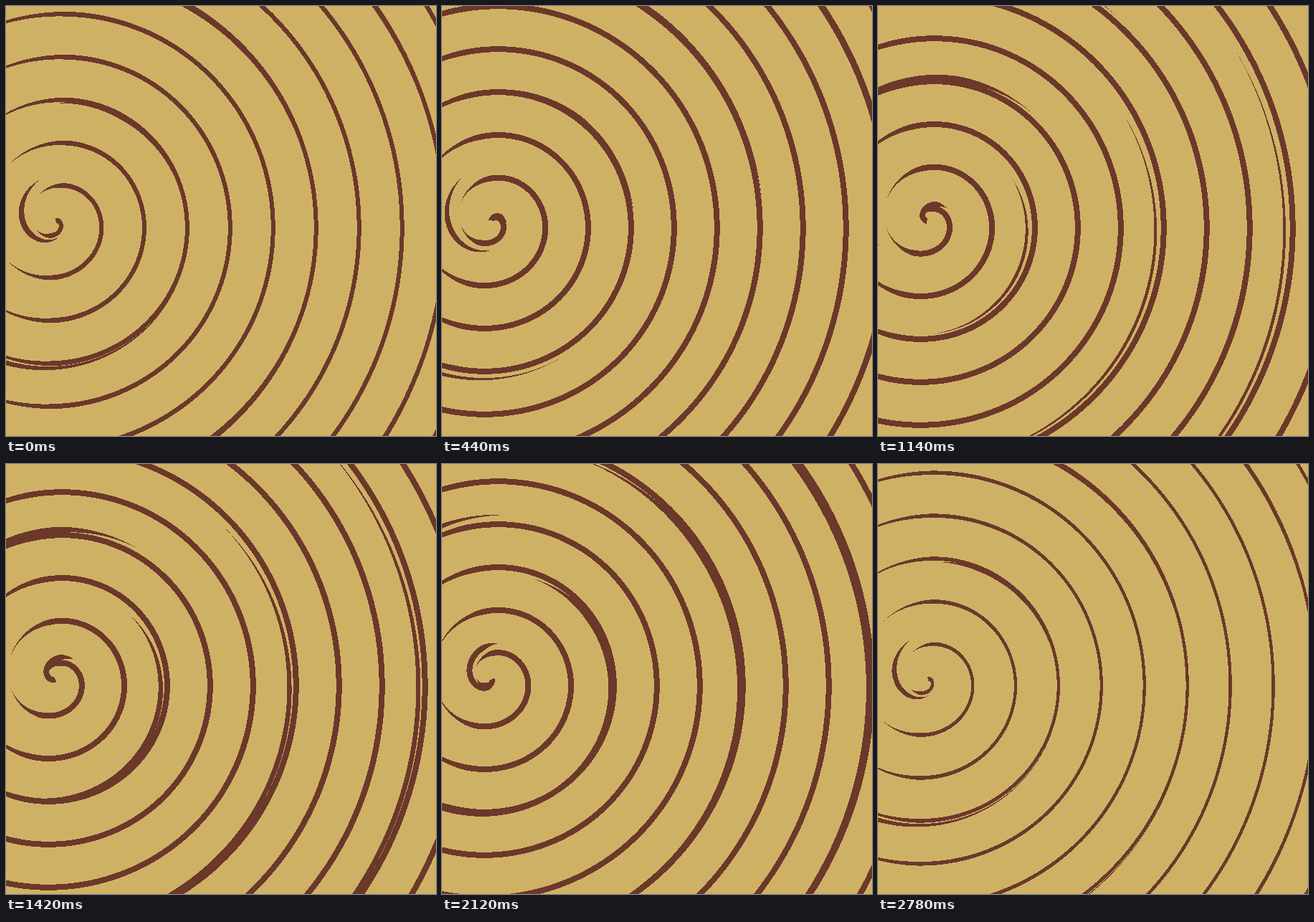
Animation of 600x600 px, one loop 2800 ms. Source, as an HTML page:

```html
<!DOCTYPE html>
<html lang="en">
<head>
<meta charset="utf-8">
<title>Spiral</title>
<style>
  html, body { margin: 0; width: 100%; height: 100%; overflow: hidden; background: #cfb166; }
  svg { display: block; width: 100%; height: 100%; }
  path { fill: #6b382a; shape-rendering: crispEdges; }
</style>
</head>
<body>
<svg viewBox="0 0 600 600"><path id="coil"/><path id="echo"/></svg>
<script>
const CX = 69, CY = 300, LOOP = 2800, MAX_R = 690;
const PITCH = 60, REPEAT = 180, SPREAD = 1.37, STEP = 2;
const RAD = Math.PI / 180;
const coil = document.getElementById('coil');
const echo = document.getElementById('echo');

// Each group of three steps cycles through these line styles;
// width depends on the cosine of the line's normal.
const STYLES = [
  { shift: 0.2, gain: 9, cut: 0.72, fade: 0.2, width: c => 7 - c },
  { shift: 1.2, gain: 11, cut: 0.95, fade: 0, width: () => 8 },
  { shift: 0.2, gain: 9, cut: 0.66, fade: 0.33, width: c => 5.6 - 1.3 * c }
];

// 60 steps per loop, held for 20, 100 and 20 ms in turn.
function stepAt(ms) {
  const rest = ms % 140;
  return 3 * Math.floor(ms / 140) + (rest < 20 ? 0 : rest < 120 ? 1 : 2);
}

// A band along a spiral; margin(cosine, angle) says how far it is from fading out.
function ribbon(from, to, radius, pitch, style, margin) {
  const outer = [], inner = [], slope = pitch / (2 * Math.PI);
  for (let deg = from; deg <= to; deg += STEP) {
    const r = radius(deg);
    if (r < 0.5) continue;
    const a = deg * RAD, n = a - Math.atan(slope / r);
    const c = Math.cos(n), s = Math.sin(n);
    const half = Math.max(0, Math.min(style.width(c), style.gain * margin(c, deg))) / 2;
    const x = CX + r * Math.cos(a), y = CY + r * Math.sin(a);
    outer.push((x + half * c).toFixed(2) + ' ' + (y + half * s).toFixed(2));
    inner.push((x - half * c).toFixed(2) + ' ' + (y - half * s).toFixed(2));
  }
  return outer.length ? 'M' + outer.concat(inner.reverse()).join('L') + 'Z' : '';
}

function draw(k) {
  const style = STYLES[k % 3];
  const base = 3.4 + k + style.shift;
  const mainR = deg => base + deg * PITCH / 360;
  const degAt = r => (r - base) * 360 / PITCH;

  coil.setAttribute('d', ribbon(degAt(0), degAt(MAX_R), mainR,
    PITCH, style, c => c + style.cut));

  // A wider spiral restarts every third turn and crosses the main one.
  let d = '';
  for (let start = 0; start < MAX_R + REPEAT; start += REPEAT) {
    const offset = deg => mainR(deg) - start;
    const wideR = deg => start + offset(deg) * SPREAD - 0.3;
    const margin = (c, deg) => {
      const o = offset(deg);
      return o > 0 ? -c - 0.043 * (o - 37) - style.fade : c + 0.46 + 0.0375 * o;
    };
    d += ribbon(degAt(start - 45), degAt(start + 65), wideR,
      PITCH * SPREAD, style, margin);
  }
  echo.setAttribute('d', d);
}

let last = -1;
function tick() {
  const k = stepAt(performance.now() % LOOP);
  if (k !== last) draw(last = k);
  requestAnimationFrame(tick);
}
tick();
</script>
</body>
</html>
```
